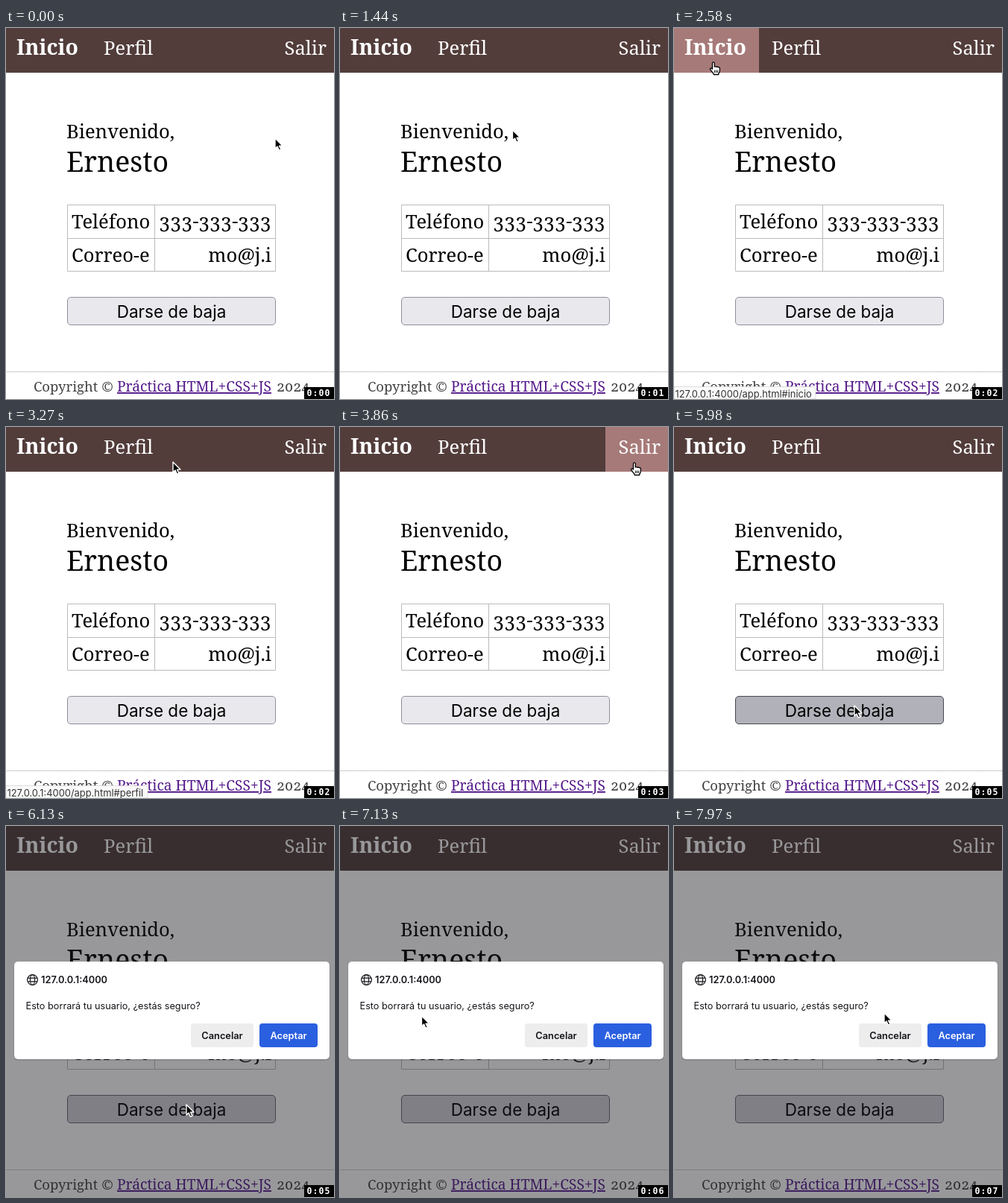
Write an HTML page that moves like this. It is 440 px wide and 498 px high and loops after 8000 ms.

```html
<!DOCTYPE html>
<html lang="es">
<head>
<meta charset="utf-8">
<title>Inicio</title>
<style>
html, body { margin: 0; width: 100%; height: 100%; overflow: hidden; background: #fff; }
svg { display: block; width: 440px; height: 498px; }
text { font-family: "Noto Serif", serif; font-weight: 500; font-variant-numeric: oldstyle-nums; font-size: 25.6px; white-space: pre; }
.ui { font-family: Inter, sans-serif; font-weight: 400; font-variant-numeric: normal; font-size: 12.8px; }
.bold { font-weight: 600; }
.nav { fill: #fff; }
.foot { font-size: 18.5px; fill: #444; }
.end { text-anchor: end; }
.mid { text-anchor: middle; }
.clock { font: bold 11.5px "DejaVu Sans Mono", monospace; fill: #fff; }
.line { fill: none; stroke: #bbb; }
</style>
</head>
<body>
<svg viewBox="0 0 440 498" xmlns="http://www.w3.org/2000/svg">
  <rect width="440" height="498" fill="#fff"/>
  <rect width="440" height="60" fill="#523d3b"/>
  <rect id="hover" height="60" fill="#a67a79"/>
  <text class="nav" x="14" y="36" style="font-weight:700;font-size:28.5px">Inicio</text>
  <text class="nav" x="131" y="36">Perfil</text>
  <text class="nav end" x="430" y="36">Salir</text>

  <text x="81" y="148">Bienvenido,</text>
  <text x="81" y="193" style="font-size:37.5px;font-weight:400">Ernesto</text>

  <path class="line" d="M82.5 237.5H361.5V326.5H82.5ZM199.5 237.5V326.5M82.5 282.5H361.5"/>
  <text x="88" y="269">Teléfono</text>
  <text class="end" x="356" y="268" style="font-size:25.8px">333-333-333</text>
  <text x="88" y="314">Correo-e</text>
  <text class="end" x="356" y="314">mo@j.i</text>

  <rect id="button" x="82.5" y="361.5" width="279" height="37" rx="4.5"/>
  <text class="ui mid" x="222" y="389" style="font-size:22.5px">Darse de baja</text>

  <path d="M1 461.5H440" stroke="#999" stroke-dasharray="1 1"/>
  <text class="foot" x="37" y="488">Copyright ©</text>
  <text class="foot" x="149" y="488" style="font-size:19.2px;fill:#551a8b;text-decoration:underline">Práctica HTML+CSS+JS</text>
  <text class="foot" x="363" y="488" style="font-size:19.2px">2024</text>

  <g id="status">
    <path d="M0 481.5H187Q190 481.5 190 484.5V498H0Z" fill="#fafafa" stroke="#ccc" stroke-width=".6"/>
    <text id="url" class="ui" x="1.5" y="496" style="font-size:12.9px;fill:#333"></text>
  </g>

  <g id="dialog">
    <rect width="440" height="498" fill="#1c1b22" fill-opacity=".45"/>
    <rect x="10" y="182" width="425" height="133" rx="6" fill="#000" fill-opacity=".1"/>
    <rect x="11" y="182" width="423" height="131" rx="5" fill="#fff"/>
    <g fill="none" stroke="#15141a" stroke-width="1.2">
      <circle cx="35.5" cy="206.5" r="6.9"/>
      <ellipse cx="35.5" cy="206.5" rx="3.1" ry="6.9"/>
      <path d="M29 204.2H42M29 208.8H42"/>
    </g>
    <g fill="#15141a">
      <text class="ui bold" x="47" y="211">127.0.0.1:4000</text>
      <text class="ui" x="26.5" y="246" style="font-size:12.7px">Esto borrará tu usuario, ¿estás seguro?</text>
      <rect x="248" y="265" width="84" height="32" rx="4" fill="#ededee"/>
      <text class="ui bold mid" x="290" y="286">Cancelar</text>
    </g>
    <rect x="340" y="265" width="78" height="32" rx="4" fill="#2a5fdf"/>
    <text class="ui bold mid" x="379" y="286" fill="#fff">Aceptar</text>
  </g>

  <g id="cursor" stroke-linejoin="round">
    <path id="arrow" d="M0 0V13.8L3.1 11L5.4 16.2L7.9 15.1L5.6 10.1H10Z" fill="#000" stroke="#fff" stroke-width="1.4"/>
    <path id="hand" d="M-1.5 9V1.2a1.4 1.4 0 0 1 2.8 0V6q1.4-1 2.6 .3q1.4-.8 2.5 .4q1.6-.4 2 1.2V11q0 2.5-1.6 4V16.5H.2V15.5q-2.4-2.8-4.6-6.2q-.4-1.9 1.6-1.4Z" fill="#fff" stroke="#000" stroke-width="1.3"/>
    <path id="knuckles" d="M1.4 10.5V14M3.5 10.5V14M5.6 10.5V14" stroke="#000"/>
  </g>

  <rect x="400" y="482" width="40" height="16" fill="#000"/>
  <text id="clock" class="clock" x="403.5 411.5 419.5 427.5" y="494"></text>
</svg>
<script>
const LOOP = 8000, STEP = 142.1, START = 435;
const $ = id => document.getElementById(id);
const show = (id, on) => $(id).setAttribute('visibility', on ? 'visible' : 'hidden');

// Pointer path: [step, x, y]
const path = [
  [-1, 361, 148], [7, 231.5, 137], [15, 53, 46], [23, 395, 48], [25, 395, 48],
  [33, 256, 335], [37, 242, 374], [41, 242, 374], [46, 95, 256],
  [49, 151, 252], [53, 282, 251]
];
// Menu areas: [left, right]
const menu = [[0, 114], [114, 214], [356, 440]];

// Button look: [fill, border]
const looks = {
  idle: ['#e9e9ed', '#8f8f9d'],
  hover: ['#d0d0d7', '#676774'],
  active: ['#b1b1b9', '#484851']
};

function pointer(k) {
  let i = 0;
  while (i < path.length - 2 && k > path[i + 1][0]) i++;
  const [k0, x0, y0] = path[i], [k1, x1, y1] = path[i + 1];
  const u = Math.min(1, (k - k0) / (k1 - k0));
  const e = u * u * (3 - 2 * u);
  return [x0 + (x1 - x0) * e, y0 + (y1 - y0) * e];
}

function draw(t) {
  // The screen refreshes in coarse steps
  const k = Math.max(-1, Math.floor((t - START) / STEP));
  const [x, y] = pointer(k);

  const area = y < 60 && menu.find(([a, b]) => x >= a && x < b);
  show('hover', area);
  if (area) {
    $('hover').setAttribute('x', area[0]);
    $('hover').setAttribute('width', area[1] - area[0]);
  }

  $('cursor').setAttribute('transform', `translate(${x.toFixed(1)} ${y.toFixed(1)})`);
  show('arrow', !area);
  show('hand', area);
  show('knuckles', area);

  show('status', k >= 13 && k < 24);
  $('url').textContent = '127.0.0.1:4000/app.html#' + (k < 18 ? 'inicio' : 'perfil');

  // The page behind the dialog keeps its hover look
  const dialog = k >= 40;
  const over = dialog || (x > 82 && x < 362 && y > 361 && y < 399);
  const [fill, border] = looks[k === 39 ? 'active' : over ? 'hover' : 'idle'];
  $('button').setAttribute('fill', fill);
  $('button').setAttribute('stroke', border);

  show('dialog', dialog);
  $('clock').textContent = '0:0' + Math.max(0, Math.floor((t - START) / 1000));
}

const origin = performance.now();
function tick() {
  draw((performance.now() - origin) % LOOP);
  requestAnimationFrame(tick);
}
draw(0);
requestAnimationFrame(tick);
</script>
</body>
</html>
```
